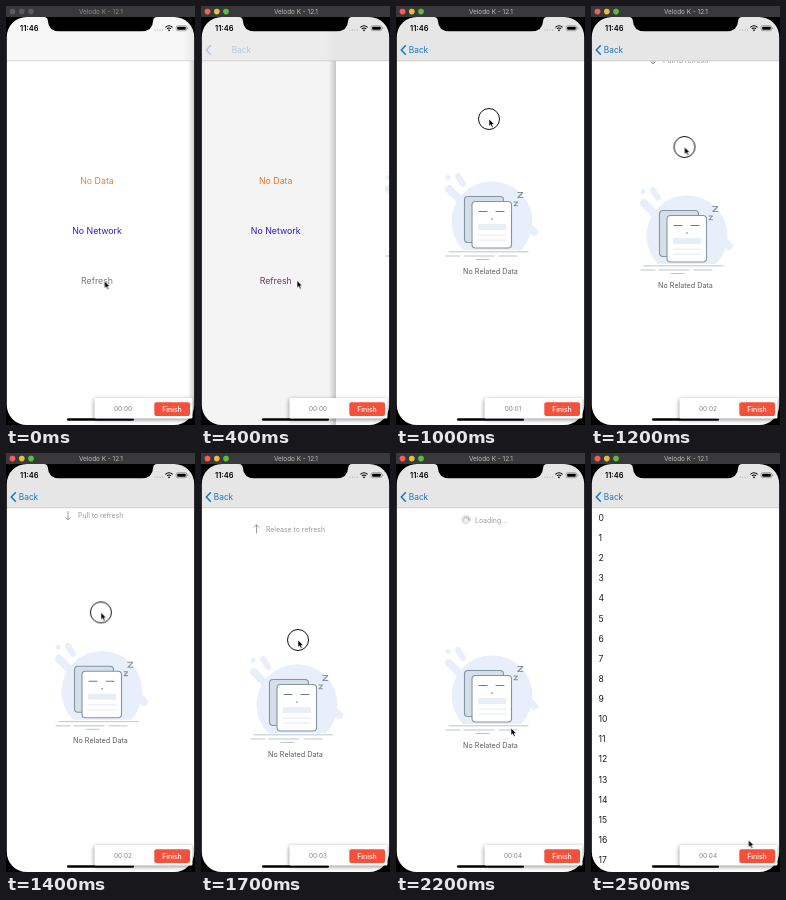
These frames come from a looping animation (189x419 px, 2600 ms). An HTML page:

```html
<!DOCTYPE html>
<html lang="en">
<head>
<meta charset="utf-8">
<title>Pull to refresh</title>
<style>
@property --p { syntax: '<number>'; inherits: true; initial-value: 0; }
@property --y { syntax: '<length>'; inherits: true; initial-value: 0px; }

html, body { margin: 0; width: 100%; height: 100%; overflow: hidden; background: #000; }
svg { display: block; width: 100vw; height: 100vh; animation: push 2.6s step-end infinite, pull 2.6s infinite; }
text { font-family: Inter, Roboto, sans-serif; dominant-baseline: central; }
.mid { text-anchor: middle; }

/* push transition: 0 = menu, 1 = detail page */
.menu { transform: translateX(calc(-57px * var(--p))); font-size: 8.8px; }
.page { transform: translateX(calc(189px * (1 - var(--p)))); }
.dim { opacity: calc(.15 * var(--p)); }
.edge { opacity: calc(1.25 * (1 - var(--p))); }
.chevron { opacity: var(--p); }
.back { opacity: var(--p); transform: translateX(calc(25px * (1 - var(--p)))); }
@keyframes push {
  0% { --p: 0; }
  15.38% { --p: .286; }
  19.23% { --p: .85; }
  23.07% { --p: .98; }
  26.92%, 100% { --p: 1; }
}

/* drag with rubber band, release, bounce back */
.scroll { transform: translateY(var(--y)); }
@keyframes pull {
  0% { --y: 0px; animation-timing-function: step-end; }
  38.46% { --y: 0px; animation-timing-function: steps(2); }
  46.15% { --y: 14px; animation-timing-function: steps(5); }
  65.38% { --y: 36px; animation-timing-function: steps(2); }
  73.07% { --y: 44px; animation-timing-function: step-end; }
  76.92% { --y: 45px; animation-timing-function: step-end; }
  80.76% { --y: 34px; animation-timing-function: step-end; }
  84.61% { --y: 27px; animation-timing-function: step-end; }
  88.46% { --y: 12px; animation-timing-function: step-end; }
  92.3%, 100% { --y: 0px; }
}

.cursor { animation: cursor 2.6s infinite; }
@keyframes cursor {
  0% { transform: translate(98.5px, 275px); animation-timing-function: steps(4); }
  15.38% { transform: translate(96px, 274.5px); animation-timing-function: step-end; }
  19.23% { transform: translate(100px, 250px); animation-timing-function: step-end; }
  23.07% { transform: translate(111px, 213px); animation-timing-function: step-end; }
  26.92% { transform: translate(120px, 186.5px); animation-timing-function: steps(3); }
  38.46% { transform: translate(93px, 113px); animation-timing-function: steps(2); }
  46.15% { transform: translate(93.5px, 141px); animation-timing-function: steps(5); }
  65.38% { transform: translate(97px, 187px); animation-timing-function: steps(2); }
  73.07% { transform: translate(98px, 203px); animation-timing-function: step-end; }
  76.92% { transform: translate(98px, 203px); animation-timing-function: step-end; }
  80.76% { transform: translate(102px, 225px); animation-timing-function: step-end; }
  84.61% { transform: translate(115px, 275px); animation-timing-function: step-end; }
  88.46% { transform: translate(135px, 335px); animation-timing-function: step-end; }
  92.3% { transform: translate(152px, 376px); animation-timing-function: step-end; }
  96.15%, 100% { transform: translate(157.5px, 387px); }
}

.state { animation: 2.6s step-end infinite; }
.press { animation-name: press; }
@keyframes press { 0%, 38.46% { opacity: 0; } 38.46% { opacity: 1; } 76.92%, 100% { opacity: 0; } }
.hint { animation-name: hint; }
@keyframes hint { 0% { opacity: 1; } 57.69%, 100% { opacity: 0; } }
.release { animation-name: release; }
@keyframes release { 0% { opacity: 0; } 57.69% { opacity: 1; } 76.92%, 100% { opacity: 0; } }
.loading { animation-name: loading; }
@keyframes loading { 0% { opacity: 0; } 76.92%, 100% { opacity: 1; } }
.empty { animation-name: empty; }
@keyframes empty { 0% { opacity: 1; } 88.46%, 100% { opacity: 0; } }
.list { animation-name: list; }
@keyframes list { 0% { opacity: 0; } 88.46%, 100% { opacity: 1; } }
.lights { animation-name: lights; }
@keyframes lights { 0% { opacity: 0; } 3.84%, 100% { opacity: 1; } }
.caption { animation-name: caption; }
@keyframes caption { 0% { fill: #8c8c8c; } 3.84%, 100% { fill: #bdbdbd; } }
.refresh { animation-name: refresh; }
@keyframes refresh { 0% { fill: #7a7380; } 7.69%, 100% { fill: #6b3e78; } }
.clock { animation-name: clock; font-size: 6.4px; fill: #858585; }
@keyframes clock {
  0% { transform: none; }
  30.76% { transform: translateY(-20px); }
  46.15% { transform: translateY(-40px); }
  65.38% { transform: translateY(-60px); }
  84.61%, 100% { transform: translateY(-80px); }
}
.spin { animation: spin 2.6s infinite; transform-origin: 70px 40px; }
@keyframes spin {
  0%, 76.92% { transform: none; animation-timing-function: steps(6); }
  100% { transform: rotate(360deg); }
}
.tip { font-size: 6.9px; fill: #9a9a9a; }
.ink { fill: none; stroke: #8494a3; stroke-width: 1.1; stroke-linecap: round; stroke-linejoin: round; }
</style>
</head>
<body>
<svg viewBox="0 0 189 419" preserveAspectRatio="none">
  <defs>
    <linearGradient id="shade">
      <stop offset="0" stop-color="#000" stop-opacity="0"/>
      <stop offset="1" stop-color="#000" stop-opacity=".22"/>
    </linearGradient>
    <linearGradient id="barEdge">
      <stop offset="0" stop-color="#e6e6e6" stop-opacity="0"/>
      <stop offset="1" stop-color="#e6e6e6"/>
    </linearGradient>
    <filter id="soft" x="-10%" y="-40%" width="120%" height="180%"><feGaussianBlur stdDeviation="2"/></filter>
    <clipPath id="clockBox"><rect x="100" y="396" width="36" height="14"/></clipPath>
  </defs>

  <rect width="189" height="419" fill="#fff"/>
  <g class="menu mid">
    <text x="91" y="174" fill="#ee8130">No Data</text>
    <text x="91" y="224" fill="#2a1fd0">No Network</text>
    <text class="state refresh" x="91" y="274">Refresh</text>
  </g>
  <rect class="dim" width="189" height="419"/>

  <g class="page">
    <rect class="edge" x="-7" y="55" width="7" height="364" fill="url(#shade)"/>
    <rect y="55" width="190" height="364" fill="#fff"/>
    <g class="scroll">
      <g class="tip">
        <g class="state hint">
          <path d="M62 35.5v8.5m-2.6-2.6 2.6 2.7 2.6-2.7" fill="none" stroke="#9a9a9a"/>
          <text x="72" y="40">Pull to refresh</text>
        </g>
        <g class="state release">
          <path d="M55.5 44.3v-8.6m-2.6 2.7 2.6-2.7 2.6 2.7" fill="none" stroke="#9a9a9a"/>
          <text x="65" y="40">Release to refresh</text>
        </g>
        <g class="state loading">
          <g class="spin" id="spinner" stroke="#777" stroke-width=".8" stroke-linecap="round"></g>
          <text x="79" y="40">Loading...</text>
        </g>
      </g>

      <g class="state empty">
        <g fill="#e9effa" stroke="#e9effa" stroke-linecap="round">
          <path d="M67 244a40.500 40.500 0 1 1 58 0z" stroke="none"/>
          <path d="M62 170l5 8" stroke-width="6"/>
          <path d="M53 183l10 10M127 215l11 11" stroke-width="8"/>
          <circle cx="52" cy="171.500" r="2.500" stroke="none"/>
        </g>
        <g class="ink">
          <rect x="68.500" y="190.500" width="39" height="46" rx="3.500" fill="#d5dfea"/>
          <rect x="76" y="195.500" width="39.500" height="46.500" rx="3.500" fill="#fff"/>
          <path d="M83 205.500h8M100 205.500h8M95.500 213h1" stroke="#6d7c8b"/>
          <path d="M53 245.800h79M50 250h14M68 250h30M103 250h18M80 253.500h13" stroke="#aab7c5" stroke-width=".8"/>
          <path d="M121.800 186.500h5l-5 5h5M118 196h3.500l-3.500 3.800h3.500"/>
        </g>
        <path d="M82 218h28v6h-28zM82 228.500h28v1.200h-28zM82 233.500h28v1.200h-28z" fill="#e7eef6"/>
        <text class="mid" x="94.500" y="265" font-size="7.200" fill="#5c5c5c">No Related Data</text>
      </g>

      <g class="state list" id="rows" font-size="8.600" fill="#1a1a1a"></g>
    </g>
  </g>

  <rect y="11" width="189" height="44" fill="#f7f7f7"/>
  <rect class="dim" y="11" width="189" height="44"/>
  <g class="page">
    <rect class="edge" x="-12" y="11" width="12" height="44" fill="url(#barEdge)"/>
    <rect y="11" width="190" height="44" fill="#e6e6e6"/>
  </g>
  <path d="M0 54.800h189" stroke="#b5b5b5" stroke-width=".5"/>
  <path class="chevron" d="M9.800 39.300 5.300 44l4.500 4.700" fill="none" stroke="#1778c2" stroke-width="1.500"/>
  <text class="back" x="12.800" y="44" font-size="8.300" fill="#1778c2">Back</text>

  <text x="14" y="22.200" font-size="7.500" font-weight="600">11:46</text>
  <g fill="#aaa">
    <circle cx="149" cy="24" r=".6"/><circle cx="151.500" cy="24" r=".6"/>
    <circle cx="154" cy="24" r=".6"/><circle cx="156.500" cy="24" r=".6"/>
  </g>
  <g fill="none" stroke="#000">
    <path d="M159.400 21.300q3.600-3.200 7.200 0M160.900 22.900q2.100-1.900 4.200 0" stroke-width="1.100"/>
    <circle cx="163" cy="24.300" r=".5"/>
    <rect x="170.200" y="19.700" width="10.500" height="5" rx="1.400" stroke="#777" stroke-width=".6"/>
    <rect x="171.200" y="20.700" width="8.500" height="3" rx=".6" fill="#000" stroke="none"/>
    <path d="M181.800 21.400v1.600" stroke="#777" stroke-width=".7"/>
  </g>
  <rect x="61" y="412.300" width="67" height="2.400" rx="1.200"/>

  <path fill-rule="evenodd" d="M0 11H189V419H0ZM.8 31A20 20 0 0 1 20.800 11H38Q41.500 11 41.800 14.500Q42.500 25.200 53 25.200H136Q146.500 25.200 147.200 14.500Q147.500 11 151 11H168.200A20 20 0 0 1 188.200 31V399A20 20 0 0 1 168.200 419H20.800A20 20 0 0 1 .8 399Z"/>

  <rect width="189" height="11" fill="#39383a"/>
  <g fill="#5b5b5d">
    <circle cx="6.500" cy="5.600" r="2.800"/><circle cx="15.800" cy="5.600" r="2.800"/><circle cx="25" cy="5.600" r="2.800"/>
  </g>
  <g class="state lights">
    <circle cx="6.500" cy="5.600" r="2.800" fill="#fc5b57"/>
    <circle cx="15.800" cy="5.600" r="2.800" fill="#e5bf3c"/>
    <circle cx="25" cy="5.600" r="2.800" fill="#57c038"/>
  </g>
  <text class="mid state caption" x="95" y="5.600" font-size="6.400">Velodo K - 12.1</text>

  <rect x="88" y="393" width="99" height="21" rx="2" opacity=".4" filter="url(#soft)"/>
  <rect x="88.500" y="392" width="98" height="20.500" rx="1.500" fill="#fff"/>
  <g clip-path="url(#clockBox)"><g class="state clock mid" id="clock"></g></g>
  <rect x="148.300" y="396.200" width="35.700" height="13.800" rx="2" fill="#f4513c"/>
  <text class="mid" x="166" y="403.200" font-size="6.900" font-weight="500" fill="#fff">Finish</text>

  <g class="cursor">
    <circle class="state press" r="10.500" fill="#fff" fill-opacity=".35" stroke="#111" stroke-width="1"/>
    <path d="M0 0V7.300L1.700 5.800 2.900 8.500 4.200 7.900 3.100 5.300H5.300Z" fill="#000" stroke="#fff" stroke-width=".6"/>
  </g>
</svg>
<script>
const byId = id => document.getElementById(id);
const repeat = (n, make) => Array.from({ length: n }, (_, i) => make(i)).join('');

byId('rows').innerHTML = repeat(18, i => `<text x="7.500" y="${65 + i * 20.12}">${i}</text>`);
byId('clock').innerHTML = repeat(5, i => `<text x="117" y="${403.2 + i * 20}">00:0${i}</text>`);
byId('spinner').innerHTML = repeat(12, i =>
  `<path d="M70 37.800v-2.200" transform="rotate(${i * 30} 70 40)" opacity="${0.25 + i * 0.06}"/>`);
</script>
</body>
</html>
```
